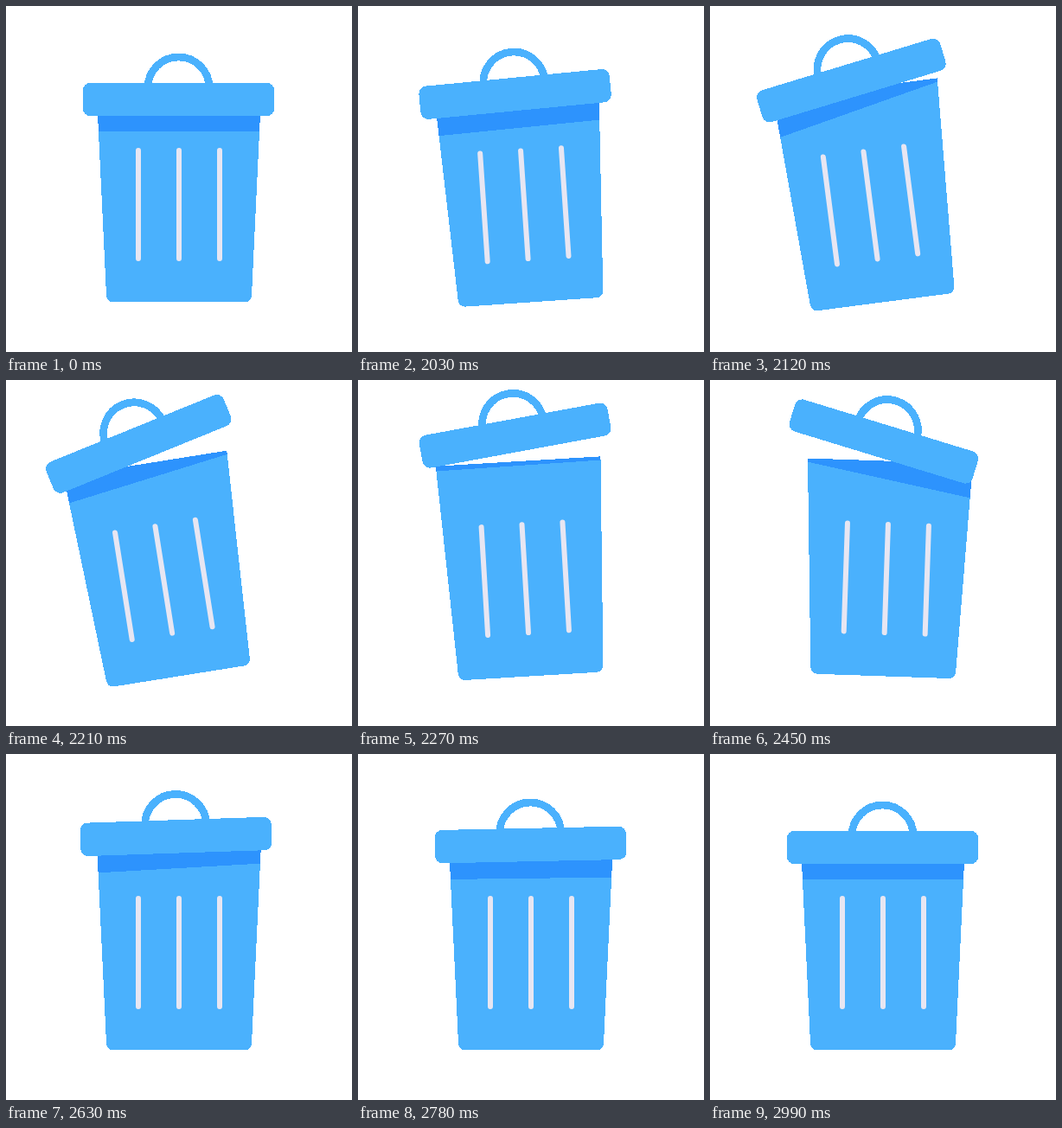
These frames come from a looping animation (400 px wide and 400 px high, 3050 ms). An HTML page:

```html
<!DOCTYPE html>
<html lang="en">
<head>
<meta charset="utf-8">
<title>Trash can</title>
<style>
  html, body { margin: 0; width: 100%; height: 100%; overflow: hidden; background: #fff; }
  svg { display: block; width: 100%; height: 100%; }
  .fill, .shade, .handle { shape-rendering: crispEdges; }
  .fill { fill: #4ab1fd; }
  .shade { fill: #2d93fd; }
  .grooves { stroke: #e7e6f2; stroke-width: 6; stroke-linecap: round; }
  .handle { fill: none; stroke: #4ab1fd; stroke-width: 8.8; }
</style>
</head>
<body>
<svg viewBox="0 0 400 400">
  <g id="can">
    <path class="fill" d="M104.5 93.6H295.5L284 334.3Q283.3 342.4 275.5 342.4H124.5Q116.7 342.4 116 334.3Z"/>
    <path class="shade" id="shade"/>
    <path class="grooves" d="M153 167V292M200 167V292M247 167V292"/>
    <g id="lid">
      <path class="handle" d="M164 94.5a35.5 35.5 0 0 1 71 0"/>
      <rect class="fill" x="88.8" y="88.8" width="221.4" height="38.4" rx="8.7"/>
    </g>
  </g>
</svg>
<script>
const LOOP = 3050, START = 2030, STEP = 30;
const TOP = 93.6, TAPER = 0.0478;

const smooth = u => u * u * (3 - 2 * u);
const clamp = u => Math.min(1, Math.max(0, u));

// Eases from each turning point [time, value] to the next
function swing(t, ...turns) {
  let [from, value] = turns[0];
  for (const [to, next] of turns.slice(1)) {
    value += (next - value) * smooth(clamp((t - from) / (to - from)));
    from = to;
  }
  return value;
}

const canTilt = t => swing(t, [1880, 0], [2210, -9.05], [2340, 3.65], [2570, 0]);
const lidTilt = t => swing(t, [1985, 0], [2195, -13.4], [2440, 15.2], [2630, -1.9], [2990, 0]);
const lidShift = t => swing(t, [1880, 0], [2210, -3.5], [2330, 0.9], [2450, -7.8], [2760, 0]);

// The lid is thrown up quickly and sinks back softly
function lidLift(t) {
  const peak = 2330, height = 47.6;
  return t < peak
    ? height * (1 - ((peak - t) / 330) ** 1.6)
    : height * Math.exp(-(((t - peak) / 256) ** 1.8));
}

// The shade under the lid shrinks as that end of the lid rises
const shadeEdge = rise => 145 - 47.2 * smooth(clamp(rise / 37));

const [can, lid, shade] = ['can', 'lid', 'shade'].map(id => document.getElementById(id));

function draw(time) {
  const resting = time < START || time >= LOOP - 2 * STEP;
  const t = START + Math.floor((time - START) / STEP) * STEP;
  const [tilt, turn, x, lift] = [canTilt, lidTilt, lidShift, lidLift].map(f => resting ? 0 : f(t));
  const reach = 95 * Math.sin(turn * Math.PI / 180);
  const left = shadeEdge(lift + reach), right = shadeEdge(lift - reach);
  const inset = depth => (depth - TOP) * TAPER;
  can.setAttribute('transform', `rotate(${tilt} 200 342)`);
  lid.setAttribute('transform', `translate(${x} ${-lift}) rotate(${turn} 199.5 108)`);
  shade.setAttribute('d',
    `M104.5 ${TOP}H295.5L${295.5 - inset(right)} ${right}L${104.5 + inset(left)} ${left}Z`);
}

const begin = performance.now();
function tick() {
  draw((performance.now() - begin) % LOOP);
  requestAnimationFrame(tick);
}
draw(0);
requestAnimationFrame(tick);
</script>
</body>
</html>
```
